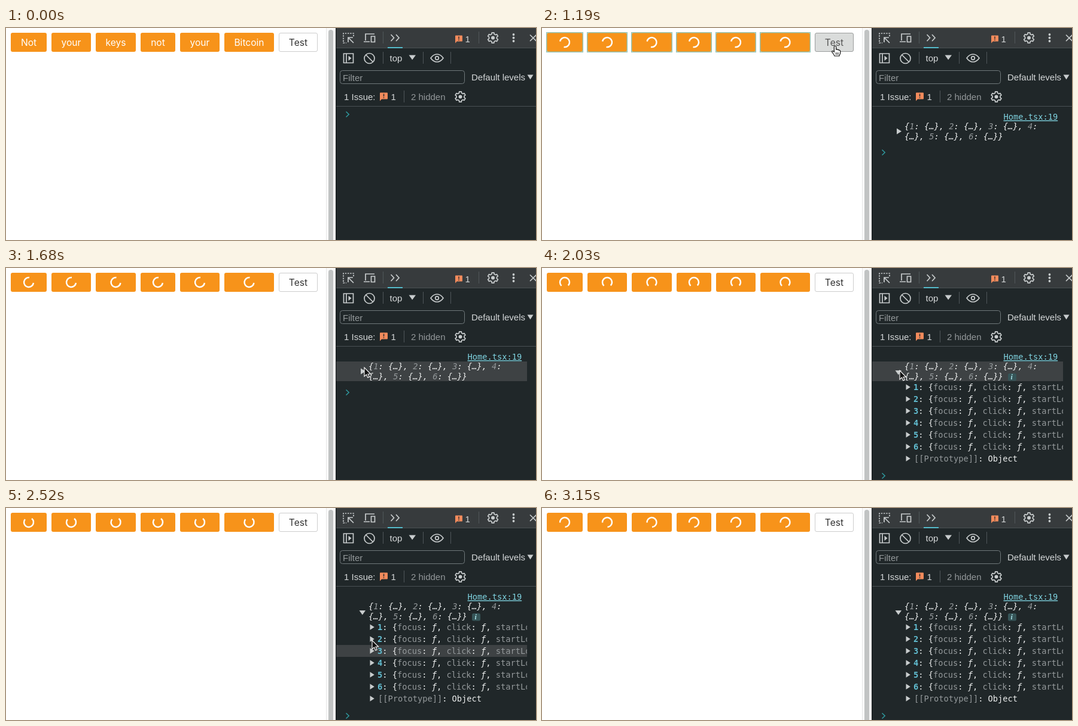
Recreate the animation shown at these times as an HTML page. Size 886 by 356 pixels, loop 3.22 s.

```html
<!DOCTYPE html>
<html lang="en">
<head>
<meta charset="utf-8">
<title>Button handles</title>
<style>
  html, body { margin: 0; width: 100%; height: 100%; overflow: hidden; background: #fff; }
  svg { display: block; }
  text { white-space: pre; }
  .btn { font: 15.6px Inter, Roboto, sans-serif; text-anchor: middle; }
  .ui { font: 15px "Liberation Sans", Arial, sans-serif; fill: #d5d8d9; }
  .mono { font: 13.7px "DejaVu Sans Mono", Menlo, monospace; fill: #eceeee; }
  .it { font-style: italic; }
  .dim { fill: #94999b; }
  .key { fill: #62bfd3; font-weight: bold; }
  .icon { fill: none; stroke: #c8cccd; stroke-width: 1.7; }
  .solid { fill: #c8cccd; }
  .sep { stroke: #50575a; }
  .prompt { fill: none; stroke: #2f9aa0; stroke-width: 1.5; }
</style>
</head>
<body>
<svg id="stage" width="886" height="356" viewBox="0 0 886 356"></svg>
<script>
const LOOP = 3220, STEP = 70;
const CARET = 490, PRESS = 980, LOAD = 1050, UNMARK = 1330, EXPAND = 1890;

const buttons = [
  ["Not", 8, 60], ["your", 76, 66], ["keys", 150, 67],
  ["not", 225, 58], ["your", 291, 66], ["Bitcoin", 365, 83]
];

// time, x, y of the pointer tip
const path = [
  [140, 395, 246], [490, 477, 50], [560, 480, 29], [840, 480, 29],
  [1050, 490, 30], [1190, 490, 30], [1540, 601, 169], [1680, 599, 167],
  [2030, 598, 172], [2170, 598, 172], [2380, 622, 250], [2520, 612, 222],
  [2800, 540, 323], [2940, 505, 362]
];

const span = (cls, s) => `<tspan class="${cls}">${s}</tspan>`;
const text = (cls, x, y, s) => `<text class="${cls}" x="${x}" y="${y}">${s}</text>`;
const icon = (d, extra = "") => `<path class="icon" d="${d}" ${extra}/>`;
const sep = (x, y, h) => `<path class="sep" d="M${x + .5} ${y}v${h}"/>`;
const solid = d => `<path class="solid" d="${d}"/>`;
const prompt = y => `<path class="prompt" d="M568.5 ${y - 4.5}l4.7 4.5l-4.7 4.5"/>`;

function gear(cx, cy) {
  const pts = [];
  for (let i = 0; i < 6; i++) {
    for (const [a, r] of [[-18, 6.6], [-12, 8.8], [12, 8.8], [18, 6.6]]) {
      const q = (i * 60 + a - 90) * Math.PI / 180;
      pts.push((cx + r * Math.cos(q)).toFixed(2) + " " + (cy + r * Math.sin(q)).toFixed(2));
    }
  }
  return icon(`M${pts.join("L")}Z`, 'stroke-linejoin="round"') +
    `<circle class="solid" cx="${cx}" cy="${cy}" r="3"/>`;
}

function issue(x, y, s) {
  return `<g transform="translate(${x} ${y}) scale(${s})">
    <path d="M1 0H12Q13 0 13 1V10Q13 11 12 11H3L0 14V1Q0 0 1 0Z" fill="#f28b5c"/>
    <path d="M6.5 2v4.5M6.5 7.7v1.6" stroke="#33302f" stroke-width="1.6"/></g>`;
}

function page() {
  const spinner = `<path d="M5.66 -5.66A8 8 0 1 1 -5.66 -5.66" fill="none" stroke="#fff" stroke-width="2.5"/>`;
  const each = f => buttons.map(([s, x, w]) => f(s, x, w)).join("");
  return `<rect width="551" height="356" fill="#fff"/>
    <rect x="535" width="15" height="356" fill="#fafafa"/>
    <path d="M535.5 0V356" stroke="#e6e6e6"/>
    <rect x="539" y="3" width="8" height="360" rx="4" fill="#c1c3c3"/>
    ${each((s, x, w) => `<rect x="${x}" y="8" width="${w}" height="32" rx="3" fill="#f7931a"/>`)}
    <g id="labels" fill="#fff">${each((s, x, w) => text("btn", x + w / 2, 30, s))}</g>
    <g id="spinners">${each((s, x, w) =>
      `<g transform="translate(${x + w / 2} 24)"><g class="spin">${spinner}</g></g>`)}</g>
    <g id="marks">${each((s, x, w) =>
      `<rect x="${x - .3}" y="7.7" width="${w + .6}" height="32.6" fill="none" stroke="#93c4b4" stroke-width="1.5"/>`)}</g>
    <rect id="test" x="456.5" y="8.5" width="64" height="31" rx="2.5"/>
    ${text("btn", 488.5, 30, span("", "Test"))}`;
}

function devtools() {
  return `<rect x="551" width="335" height="356" fill="#202729"/>
    <rect x="551" width="335" height="33" fill="#373b3d"/>
    <path d="M551 33.5H886M551 131.5H886" stroke="#4a5154"/>
    <path d="M551.5 0V356" stroke="#15191a"/>
    <rect x="638" y="32" width="25" height="2" fill="#55bccb"/>
    ${icon("M581 14V9H564V25H569", 'stroke-dasharray="2.4 1.8"')}
    ${icon("M572 24V16H580M572.5 16.5L581 25")}
    ${icon("M601 21V10H616M598 23H608M610.5 14H616.5V23.5H610.5Z")}
    ${icon("M643.5 11l5 5.5l-5 5.5M652 11l5 5.5l-5 5.5")}
    ${issue(751, 12.5, .92)}${text("ui", 767.5, 24, "1")}
    ${gear(814, 16.5)}
    ${[11, 16.5, 22].map(y => `<circle class="solid" cx="848.5" cy="${y}" r="1.9"/>`).join("")}
    ${icon("M876 11.5l10.5 10.5M876 22l10.5 -10.5")}
    ${sep(630, 6, 20)}${sep(790, 6, 20)}
    ${icon("M564.5 43H580.5V58.5H564.5ZM569 43V58.5")}${solid("M572.5 46.5L577.5 50.8L572.5 55Z")}
    <circle class="icon" cx="607.5" cy="51" r="8.5"/>${icon("M601.5 45l12 12")}
    ${sep(630, 40, 20)}${text("ui", 641.5, 56, "top")}${solid("M673.5 45.5H685L679.2 53.5Z")}
    ${sep(697, 40, 20)}${icon("M710 50.5Q714.5 44 720.5 44T731 50.5Q726.5 57 720.5 57T710 50.5Z")}
    <circle class="icon" cx="720.5" cy="50.5" r="2.8"/>${sep(743, 40, 20)}
    <rect x="558.5" y="71.5" width="208" height="22" rx="4" fill="none" stroke="#70787b"/>
    ${text("ui dim", 563, 89, span("dim", "Filter"))}
    ${text("ui", 778, 88, "Default levels")}${solid("M871.5 78.5H881.5L876.5 86.5Z")}
    ${text("ui", 565, 121, "1 Issue:")}${issue(625, 108.5, 1)}${text("ui", 643.5, 121, "1")}
    ${sep(665, 105, 20)}${text("ui", 677, 121, span("dim", "2 hidden"))}${gear(759.5, 115.5)}`;
}

function consoleLog() {
  const item = n => span("dim", n) + ": {…}";
  const fn = name => span("dim", name) + ": " + span("it", "ƒ") + ", ";
  const tri = y => solid(`M608.5 ${y - 4.8}L615.8 ${y}L608.5 ${y + 4.8}Z`);
  let rows = "";
  for (let i = 0; i < 6; i++) {
    const y = 200 + i * 20;
    rows += tri(y) + text("mono", 621, y + 5,
      span("key", i + 1) + ": {" + fn("focus") + fn("click") + span("dim", "startLoading"));
  }
  rows += tri(320) + text("mono", 622, 325, span("dim", "[[Prototype]]") + ": Object");
  return `<rect id="hover" x="552" width="319" fill="#3e4244"/>
    <g id="idle">${prompt(145)}</g>
    <path id="caret" d="M584.5 137V153" stroke="#f0f2f2"/>
    <g id="log">
      ${text("mono", 771.5, 154, `<tspan fill="#7fd3e0" text-decoration="underline">Home.tsx:19</tspan>`)}
      ${text("mono it", 606, 170, "{" + [1, 2, 3].map(item).join(", ") + ", " + span("dim", 4) + ":")}
      ${text("mono it", 606, 187, "{…}, " + item(5) + ", " + item(6) + "}")}
    </g>
    <g id="closed">${solid("M593 168.5L601 173.5L593 178.5Z")}${prompt(209)}</g>
    <g id="open" clip-path="url(#pane)">
      ${solid("M590.5 172H601L595.8 179.5Z")}
      <rect x="779" y="177" width="14" height="12.5" rx="2.5" fill="#365558"/>
      <text x="783.5" y="187" fill="#a8e0e6" font-family="Liberation Serif, serif" font-size="12" font-style="italic" font-weight="bold">i</text>
      ${rows}${prompt(349)}
    </g>`;
}

const cursors = `
  <path id="arrow" d="M0 0V15L3.5 11.9L5.8 17L8.2 16L6 11H10.6Z" fill="#111" stroke="#fff" stroke-width="1.1"/>
  <g id="hand" stroke="#111" stroke-width="1.2">
    <path d="M-1.6 1.6Q-1.6 0 0 0T1.6 1.6V6Q3.6 5 4.3 6.6Q6.1 6 6.7 7.4Q8.7 7 8.7 9V12Q8.5 14 7 16V17H-1Q-2 14.5 -4 12Q-6 9.5 -5 8.8Q-3.5 8 -1.6 10Z" fill="#fff"/>
    <path d="M1.3 11v4M3.3 11v4M5.3 11v4" stroke-width=".8"/>
  </g>`;

document.getElementById("stage").innerHTML =
  `<clipPath id="pane"><rect x="552" y="132" width="319" height="224"/></clipPath>
  ${page()}${devtools()}${consoleLog()}${cursors}`;

const $ = id => document.getElementById(id);
const show = (id, on) => $(id).setAttribute("visibility", on ? "visible" : "hidden");
const spins = document.querySelectorAll(".spin");

function pointer(t) {
  const i = path.findIndex(p => p[0] >= t);
  if (i < 0 || t < path[0][0]) return null;
  const b = path[i], a = path[Math.max(0, i - 1)];
  const k = b === a ? 0 : (t - a[0]) / (b[0] - a[0]);
  return { x: a[1] + (b[1] - a[1]) * k, y: a[2] + (b[2] - a[2]) * k };
}

// The hovered row trails the pointer by one step.
function hoverRow(t) {
  const p = pointer(t - STEP);
  if (!p || t < LOAD || p.x < 552) return null;
  if (p.y >= 157 && p.y < 190) return [157, 33];
  const i = Math.floor((p.y - 190) / 20);
  return t >= EXPAND && i >= 0 && i < 7 ? [190 + i * 20, 20] : null;
}

function draw(t) {
  const loading = t >= LOAD, open = t >= EXPAND;
  show("labels", !loading);
  show("spinners", loading);
  show("marks", loading && t < UNMARK);
  show("idle", !loading);
  show("caret", t >= CARET && t < PRESS);
  show("log", loading);
  show("closed", loading && !open);
  show("open", open);

  const angle = 52 + (t - 1680) * .36;
  spins.forEach(s => s.setAttribute("transform", `rotate(${angle})`));

  const row = hoverRow(t);
  show("hover", row);
  if (row) {
    $("hover").setAttribute("y", row[0]);
    $("hover").setAttribute("height", row[1]);
  }

  const p = pointer(t);
  const over = p && p.x > 456 && p.x < 521 && p.y > 8 && p.y < 40;
  show("arrow", p && !over);
  show("hand", over);
  if (p) $(over ? "hand" : "arrow").setAttribute("transform", `translate(${p.x} ${p.y})`);

  const pressed = over && t >= PRESS;
  const label = $("test").nextElementSibling;
  $("test").setAttribute("fill", pressed ? "#dadcdb" : over ? "#f4f4f4" : "#fff");
  $("test").setAttribute("stroke", pressed ? "#9b9d9d" : over ? "#b8b8b8" : "#cdcdcd");
  label.setAttribute("fill", pressed ? "#555" : "#333");
}

const start = performance.now();
function tick() {
  const t = (performance.now() - start) % LOOP;
  draw(Math.floor(t / STEP) * STEP);
  requestAnimationFrame(tick);
}
draw(0);
requestAnimationFrame(tick);
</script>
</body>
</html>
```
